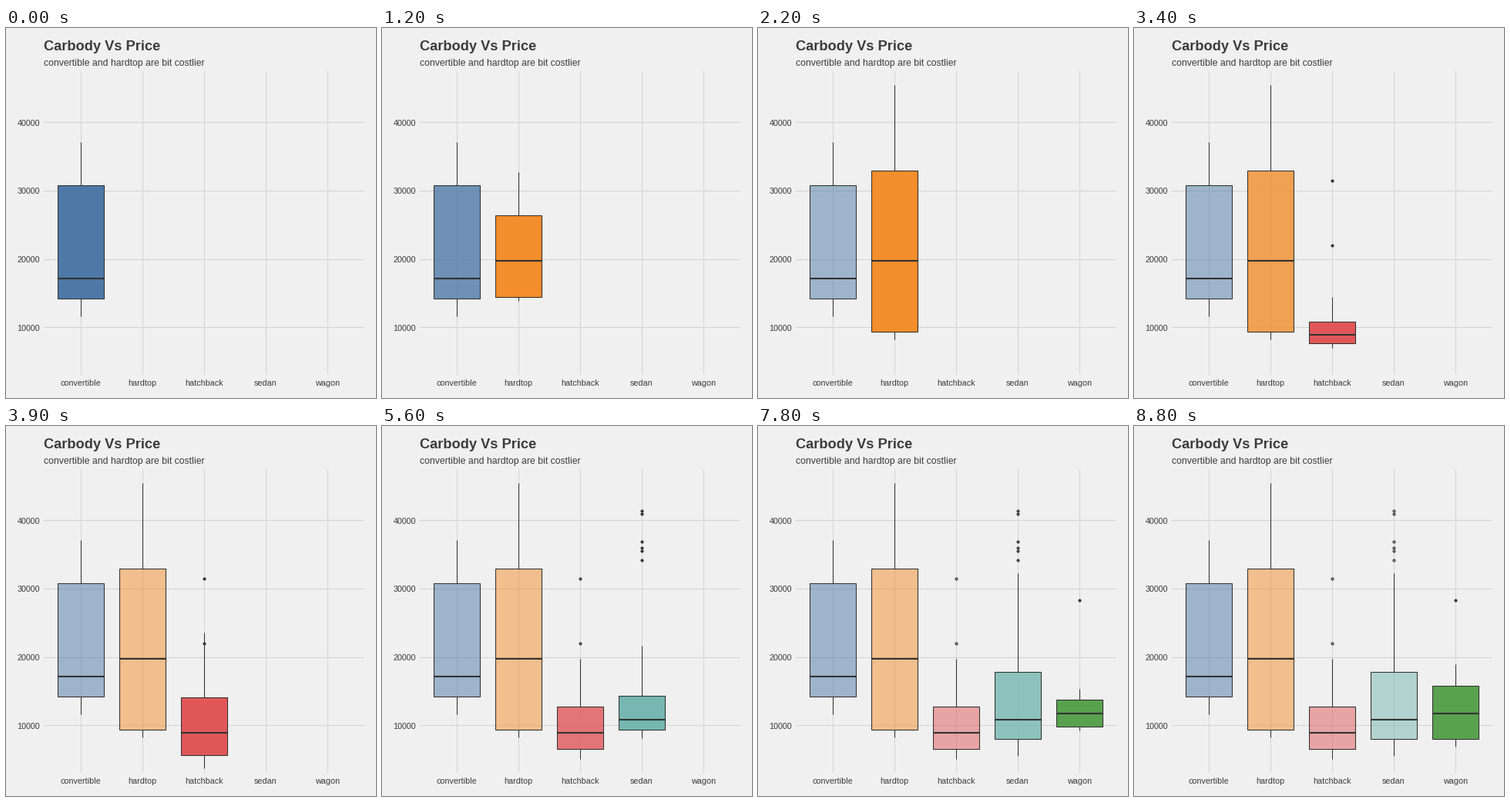
A matplotlib script for the animation above (10000 ms loop, 480 by 480 pixels).

```python
import numpy as np
import matplotlib.pyplot as plt
from matplotlib.animation import FuncAnimation

SIZE, DPI = 480, 80
FRAMES, INTERVAL = 100, 100
FIRST, CYCLE, GROW = 11, 22, 11       # hold, state length, growth length in frames

BACK, GRID, INK, TEXT = "#F0F0F0", "#D2D2D2", "#333333", "#3C3C3C"
LEFT, RIGHT, TOP, BOTTOM = 49, 465, 56, 450
PX_10K, PX_40K = 388.37, 122.03       # heights of two price levels

# name, fill, (low whisker, quartiles, high whisker), outliers
BODIES = [
    ("convertible", "#4E79A7", (11595, 14197, 17084, 30801, 37028), []),
    ("hardtop", "#F28E2B", (8249, 9341, 19687, 32903, 45400), []),
    ("hatchback", "#E15759", (5118, 6513, 8970, 12764, 19699), [22018, 31400]),
    ("sedan", "#76B7B2", (5499, 8013, 10832, 17800, 32250),
     [34184, 35550, 36000, 36880, 40960, 41315]),
    ("wagon", "#59A14F", (6918, 8013, 11694, 15750, 18950), [28248]),
]


def pt(px):
    return px * 72 / DPI


def price_at(y):
    return 10000 + (PX_10K - y) * 30000 / (PX_10K - PX_40K)


def height_of(price):
    return PX_10K - (price - 10000) * (PX_10K - PX_40K) / 30000


def back_out(t):
    f = 1 - t
    return 1 - (f ** 3 - f * np.sin(f * np.pi))


fig = plt.figure(figsize=(SIZE / DPI, SIZE / DPI), dpi=DPI, facecolor=BACK)
ax = fig.add_axes([LEFT / SIZE, 1 - BOTTOM / SIZE,
                   (RIGHT - LEFT) / SIZE, (BOTTOM - TOP) / SIZE])
ax.set_xlim(0.4, 5.6)
ax.set_ylim(price_at(BOTTOM), price_at(TOP))
ax.axis("off")


def label(x, y, text, size, **kw):
    fig.text(x / SIZE, 1 - y / SIZE, text, fontsize=pt(size), color=TEXT,
             family="Liberation Sans", va="baseline", **kw)


label(49, 29, "Carbody Vs Price", 18.3, weight="bold")
label(49, 49, "convertible and hardtop are bit costlier", 12.25)
for price in range(10000, 50000, 10000):
    ax.axhline(price, color=GRID, lw=pt(1), zorder=0)
    label(44, height_of(price) + 4.5, str(price), 10.7, ha="right")
for i, body in enumerate(BODIES):
    ax.axvline(i + 1, color=GRID, lw=pt(1), zorder=0)
    label(97 + 80 * i, 464, body[0], 10.7, ha="center")


class Box:
    def __init__(self, x, color, stats, outliers):
        self.x, self.color, self.stats = x, color, np.array(stats, float)
        self.rect = plt.Rectangle((x - 0.375, 0), 0.75, 1, ec=INK,
                                  lw=pt(1.07), zorder=3)
        ax.add_patch(self.rect)
        self.whiskers = [self.line([x, x], 1.07) for _ in range(2)]
        self.median = self.line([x - 0.375, x + 0.375], 2.1)
        self.dots, = ax.plot([x] * len(outliers), outliers, "o", ms=pt(3.2),
                             mec=INK, mew=pt(0.9), zorder=4)
        self.parts = [self.rect, *self.whiskers, self.median, self.dots]

    def line(self, xs, width):
        return ax.plot(xs, [0, 0], color=INK, lw=pt(width), zorder=4,
                       solid_capstyle="butt")[0]

    def show(self, t, alpha):
        for part in self.parts:
            part.set_visible(t > 0)
        mid = self.stats[2]
        low, q1, _, q3, high = mid + (self.stats - mid) * back_out(t)
        self.rect.set_y(q1)
        self.rect.set_height(q3 - q1)
        self.rect.set_facecolor((self.color, alpha))
        self.whiskers[0].set_ydata([low, q1])
        self.whiskers[1].set_ydata([q3, high])
        self.median.set_ydata([mid, mid])
        self.dots.set_markerfacecolor((INK, alpha))


boxes = [Box(i + 1, *body[1:]) for i, body in enumerate(BODIES)]


def draw(n):
    for i, box in enumerate(boxes):
        step = n - FIRST - CYCLE * (i - 1)
        t = 1 if i == 0 else min(max(step / GROW, 0), 1)
        passed = step - CYCLE         # steps since the next box began
        alpha = 1 if passed <= 0 else 0.8 if passed == 1 else 0.5
        box.show(t, alpha)
    return [part for box in boxes for part in box.parts]


anim = FuncAnimation(fig, draw, frames=FRAMES, interval=INTERVAL,
                     init_func=lambda: draw(0), repeat=True, repeat_delay=0)
plt.show()
```
